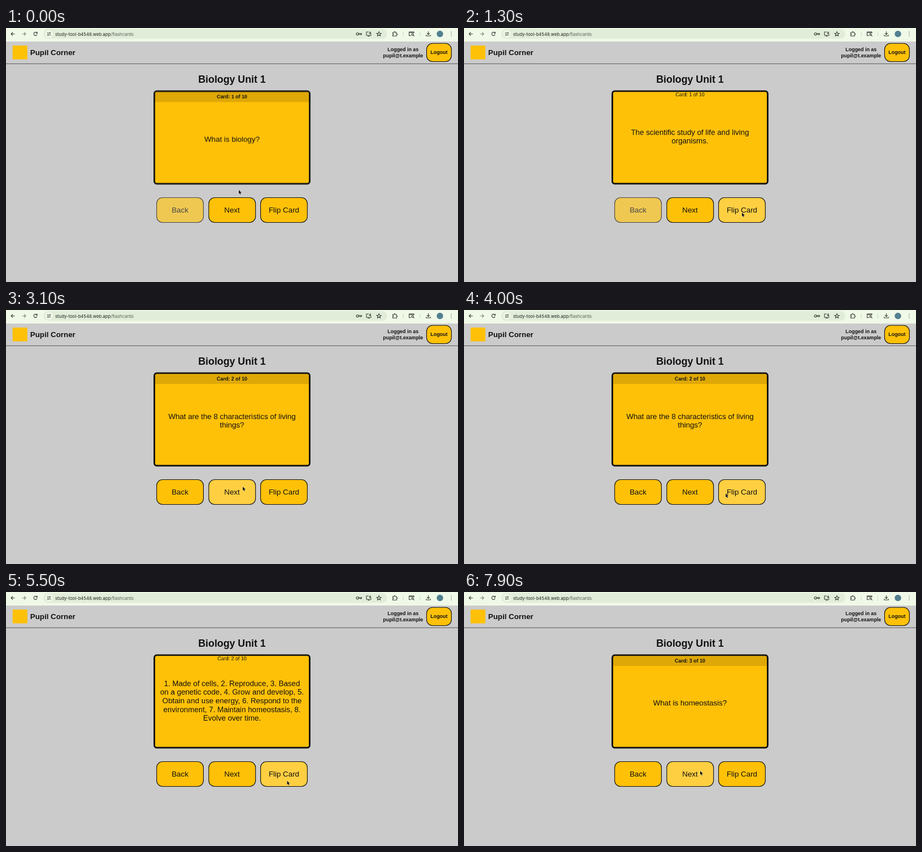
Recreate the animation shown at these times as an HTML page. Size 800 by 450 pixels, loop 8000 ms.

```html
<!DOCTYPE html>
<html lang="en">
<head>
<meta charset="utf-8">
<title>Flashcards</title>
<style>
  html, body { margin: 0; width: 800px; height: 450px; overflow: hidden; background: #cbcbcb; }
  svg { position: absolute; left: 0; top: 0; }
  /* The page is laid out at 1440 x 810 and scaled to the stage. */
  #page { position: absolute; width: 1440px; height: 810px; transform: scale(.555556); transform-origin: 0 0;
    font: 24px "Liberation Sans", Arial, sans-serif; color: #111; }
  #page > * { position: absolute; box-sizing: border-box; }
  header { top: 43px; width: 1440px; height: 71.5px; border-bottom: 2px solid #666; }
  .mark { left: 21px; top: 56px; width: 47px; height: 44px; background: #ffc107; }
  .brand { left: 77px; top: 65px; font-weight: bold; }
  .account { left: 1165px; top: 60px; width: 200px; font: bold 16px/18.5px "Liberation Sans", Arial, sans-serif; text-align: center; }
  h1 { margin: 0; top: 146px; width: 1440px; font-size: 32px; text-align: center; }
  .button { top: 540px; width: 151px; height: 81px; border: 2px solid #111; border-radius: 20px;
    background: #ffc107; display: grid; place-items: center; }
  .button.hover { background: #ffcf42; }
  .button.off { opacity: .7; background: #ffc720; }
  .logout { left: 1339px; top: 48px; width: 81px; height: 60px; font-size: 16px; font-weight: bold; }
  .face { left: 470px; top: 199px; width: 500px; height: 300px; border: 5px solid #111; border-radius: 10px;
    background: #ffc107; overflow: hidden; text-align: center; backface-visibility: hidden; }
  .label { font-size: 16px; line-height: 18px; }
  .front .label { font-weight: bold; line-height: 32px; background: rgba(0, 0, 0, .13); }
  .text { position: absolute; width: 100%; top: 142.5px; transform: translateY(-50%); line-height: 27.7px; white-space: pre; }
  .front .text { top: 149.5px; }
</style>
</head>
<body>
<svg width="800" height="24" fill="none" stroke="#3c4239" stroke-width="1.1">
  <path d="M0 0H800V24H0Z" fill="#f0f9e8" stroke="none"/>
  <rect x="66" y="2" width="609" height="17" rx="8.5" fill="#e2edd9" stroke="none"/>
  <path d="M15.500 10.500H9M12 7.500L9 10.500L12 13.500"/>
  <path d="M28.500 10.500H35M32 7.500L35 10.500L32 13.500" stroke="#848b80"/>
  <path d="M54.700 8.800A3 3 0 1 0 55 11.200M55.300 6.800V9.200H52.900"/>
  <circle cx="76" cy="10.500" r="6.500" fill="#f0f9e8" stroke="none"/>
  <path d="M72.500 8.800H75.500M79.500 12.300H76.500" stroke-width="1"/>
  <circle cx="77.500" cy="8.800" r="1.200" stroke-width="1"/>
  <circle cx="74.500" cy="12.300" r="1.200" stroke-width="1"/>
  <circle cx="622" cy="10.500" r="2"/>
  <path d="M624 9.700H629.500V11.300H624M627.800 11V12.800"/>
  <path d="M642 7H638V13H646V11M640 14.500H644M644.500 6V10M642.700 8.500L644.500 10.300L646.300 8.500"/>
  <path d="M660 6.500L661.200 9.200L664 9.400L661.800 11.200L662.500 14L660 12.500L657.500 14L658.200 11.200L656 9.400L658.800 9.200Z"/>
  <path d="M684.500 8H687C686.500 5.700 689.500 5.700 689 8H691.200V10C693 9.700 693 12.300 691.200 12V14.200H684.500V12C686.500 12 686.500 10 684.500 10Z"/>
  <path d="M703 6.500V15M732.500 6.500V15" stroke="#c3e2b4"/>
  <path d="M717 13.500H713.500V7H722V9M713.500 8H722"/>
  <circle cx="719.500" cy="11.500" r="1.600"/>
  <path d="M720.700 12.700L722.500 14.500M747.500 6V11.500M745 9.200L747.500 11.700L750 9.200M743.800 12V14H751.200V12"/>
  <circle cx="768" cy="10.500" r="5.700" fill="#527f91" stroke="none"/>
  <path d="M788 6.800V7.800M788 10V11M788 13.200V14.200" stroke-width="1.300"/>
  <text x="87" y="13.600" font-family="Inter, sans-serif" font-size="7.72" fill="#1d211b" stroke="none">study-tool-b4548.web.app<tspan fill="#596055">/flashcards</tspan></text>
</svg>

<div id="page">
  <header></header>
  <div class="mark"></div>
  <div class="brand">Pupil Corner</div>
  <div class="account">Logged in as<br>pupil@t.example</div>
  <div class="button logout">Logout</div>
  <h1>Biology Unit 1</h1>
  <div class="face front"><div class="label"></div><div class="text"></div></div>
  <div class="face back"><div class="label"></div><div class="text"></div></div>
  <div class="button nav" style="left:479px">Back</div>
  <div class="button nav" style="left:644.5px">Next</div>
  <div class="button nav" style="left:810px">Flip Card</div>
</div>

<svg id="cursor" width="12" height="12" overflow="visible">
  <path d="M0 0V6.800L1.600 5.400L2.700 8L3.900 7.500L2.800 5H5Z" fill="#111" stroke="#fff" stroke-opacity=".6" stroke-width=".9" paint-order="stroke"/>
</svg>

<script>
const LOOP = 8000, FLIP_TIME = 400;
const cards = [
  ["What is biology?", "The scientific study of life and living\norganisms."],
  ["What are the 8 characteristics of living\nthings?",
   "1. Made of cells, 2. Reproduce, 3. Based\non a genetic code, 4. Grow and develop, 5.\nObtain and use energy, 6. Respond to the\nenvironment, 7. Maintain homeostasis, 8.\nEvolve over time."],
  ["What is homeostasis?", "The maintenance of stable internal\nconditions."]
];
const nextClicks = [2425, 7335];
const flips = [[835, 180], [2425, 0], [5100, 180], [7335, 0]];   // start time, final angle
const cursorPath = [                                             // time, x, y
  [0, 412, 287], [40, 412, 287], [500, 492, 326], [650, 492, 326], [700, 492, 327],
  [1650, 492, 327], [2280, 419, 313], [3530, 419, 313], [4400, 497.5, 334.5],
  [5820, 497.5, 334.5], [6700, 419, 318], [6950, 419, 318], [7200, 418, 317], [LOOP, 418, 317]
];

const faces = [...document.querySelectorAll(".face")];
const buttons = [...document.querySelectorAll(".nav")];
const cursor = document.getElementById("cursor");

// CSS "ease": cubic-bezier(.25, .1, .25, 1)
function ease(x) {
  let lo = 0, hi = 1, s;
  for (let i = 0; i < 24; i++) {
    s = (lo + hi) / 2;
    if (.75 * s * (1 - s) + s ** 3 < x) lo = s; else hi = s;
  }
  return .3 * s * (1 - s) ** 2 + 3 * s * s * (1 - s) + s ** 3;
}

function cardAngle(t) {
  let angle = 0;
  for (const [start, end] of flips)
    if (t >= start) angle += (end - angle) * ease(Math.min(1, (t - start) / FLIP_TIME));
  return angle;
}

function cursorAt(t) {
  const i = cursorPath.findIndex(p => p[0] > t);
  const [t0, x0, y0] = cursorPath[i - 1], [t1, x1, y1] = cursorPath[i];
  const u = (t - t0) / (t1 - t0), k = u * u * (3 - 2 * u);
  return [x0 + (x1 - x0) * k, y0 + (y1 - y0) * k];
}

function setText(element, text) {
  if (element.textContent !== text) element.textContent = text;
}

function draw(now) {
  const t = now % LOOP, angle = cardAngle(t), [x, y] = cursorAt(t);
  const index = nextClicks.filter(click => t >= click).length;
  faces.forEach((face, side) => {
    face.style.transform = `perspective(1000px) rotateY(${angle - 180 * side}deg)`;
    setText(face.children[0], `Card: ${index + 1} of 10`);
    setText(face.children[1], cards[index][side]);
  });
  buttons.forEach((button, i) => {
    const left = 266 + i * 92;
    button.classList.toggle("hover", x > left && x < left + 84 && y > 300 && y < 345);
  });
  buttons[0].classList.toggle("off", index === 0);
  cursor.style.transform = `translate(${x}px, ${y}px)`;
  requestAnimationFrame(draw);
}
requestAnimationFrame(draw);
</script>
</body>
</html>
```
